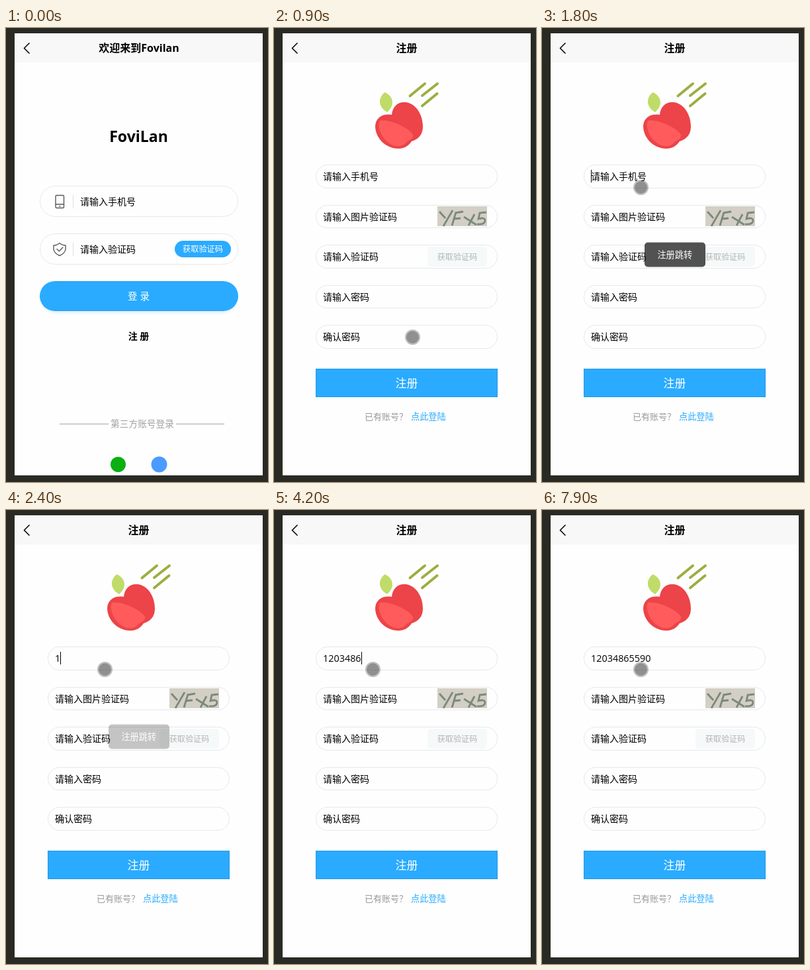
Write an HTML page that moves like this. It is 396x685 px and loops after 8000 ms.

```html
<!DOCTYPE html>
<html lang="zh-CN">
<head>
<meta charset="utf-8">
<title>注册</title>
<style>
html, body { margin: 0; width: 100%; height: 100%; overflow: hidden; background: #292a23; }
svg { display: block; }
text { font: 14px "Open Sans", "Noto Sans CJK SC", "Noto Sans CJK", sans-serif; fill: #000; white-space: pre; }
.mid { text-anchor: middle; }
.bold { font-weight: 700; }
.white { fill: #fff; }
.field { fill: #fefefe; stroke: #e6e8e9; }
.icon { fill: none; stroke: #5a5a5a; stroke-width: 1.4; stroke-linejoin: round; stroke-linecap: round; }
.rule { stroke: #a6a6a6; }
.blue { fill: #2aabff; }
.edge { fill: none; stroke: #2599e5; }
</style>
</head>
<body>
<svg width="396" height="685" viewBox="0 0 396 685">
  <defs>
    <filter id="glow" x="-10%" y="-30%" width="120%" height="180%">
      <feGaussianBlur stdDeviation="2.5"/>
    </filter>
    <radialGradient id="press">
      <stop offset="0" stop-color="#000" stop-opacity=".28"/>
      <stop offset="1" stop-color="#000" stop-opacity=".04"/>
    </radialGradient>
  </defs>

  <rect width="396" height="685" fill="#292a23"/>
  <rect x="13" y="8" width="375" height="667" fill="#fefefe"/>
  <rect x="13" y="8" width="375" height="44" fill="#f8f8f8"/>
  <path d="M35.5 22.5L27.5 30.5L35.5 38.5" fill="none" stroke="#000" stroke-width="1.5"/>

  <g id="login">
    <text class="mid bold" x="201" y="36" style="font-size:16px">欢迎来到Fovilan</text>
    <text class="mid bold" x="200.5" y="172" style="font-size:23px">FoviLan</text>

    <rect class="field" x="51.5" y="238.5" width="299" height="46" rx="23"/>
    <rect class="field" x="51.5" y="310.5" width="299" height="46" rx="23"/>
    <path d="M101.5 252V272M101.5 324V344" stroke="#dedede"/>
    <g class="icon">
      <rect x="75" y="252.5" width="12.5" height="19" rx="1.5"/>
      <path d="M75 266H87.5M80.7 269H82"/>
      <path d="M81 324.5Q85 328 90 328V334Q89 340 81 343.5Q73 340 72 334V328Q77 328 81 324.5Z"/>
      <path d="M77 333.5L80.3 336.7L86 331"/>
    </g>
    <text x="112" y="267">请输入手机号</text>
    <text x="112" y="339">请输入验证码</text>
    <rect class="blue" x="255" y="321" width="85" height="25" rx="12.5"/>
    <text class="mid white" x="297.5" y="338" style="font-size:12.2px">获取验证码</text>

    <rect x="54" y="386" width="294" height="43" rx="21.5" fill="#c9e9ff" filter="url(#glow)"/>
    <rect class="blue" x="51" y="382" width="300" height="45" rx="22.5"/>
    <path class="edge" d="M73 382.5H329M73 426.5H329"/>
    <text class="mid white" x="200.5" y="410" style="font-size:14.5px">登 录</text>
    <text class="mid bold" x="200.5" y="470">注 册</text>

    <path class="rule" d="M81 597.5H155M257 597.5H330"/>
    <text class="mid" x="206" y="602" style="font-size:13.7px;fill:#a0a0a0">第三方账号登录</text>
    <circle cx="169.5" cy="658.5" r="11.5" fill="#0aaf12"/>
    <circle cx="231.5" cy="658.5" r="12" fill="#4a9bff"/>
  </g>

  <g id="signup">
    <text class="mid bold" x="200.5" y="36" style="font-size:16px">注册</text>

    <path fill="#ec4448" d="M178 131C179 118 188 111 198 112C214 113 225 130 225 149C225 162 217 168 208 171C203 178 197 182 188 182C168 182 153 165 153 148C154 135 164 129 178 131Z"/>
    <path fill="#ff5b5d" d="M160 140C171 137 202 148 210 161C211 168 204 169 200 172C197 177 190 179 184 178C169 176 154 153 160 140Z"/>
    <path fill="#bfdc68" d="M167.500 97C181 103 183 117 171 127C158 120 156 106 167.500 97Z"/>
    <path d="M205.500 102.500L228 84M224 102L247 84M224 117.500L246.500 99" fill="none" stroke="#9cae40" stroke-width="4" stroke-linecap="round"/>

    <g id="fields"></g>
    <text id="phone" x="74" y="229"></text>
    <rect id="caret" y="214" width="1" height="19"/>

    <rect x="247" y="269" width="75" height="30" fill="#d3cfc4"/>
    <path d="M250 277L259 287M270 275L256 299M275 278L269 298M274 279L286 277M272 288L282 287M287 285L306 297M303 281L294 298M321 278L311 279L309 288Q319 285 319 291Q318 297 307 296" fill="none" stroke="#7c897d" stroke-width="2.8"/>
    <rect x="232" y="330" width="90" height="30" rx="5" fill="#f6f9f9"/>
    <text class="mid" x="277" y="350" style="font-size:12.1px;fill:#b4b4b4">获取验证码</text>

    <rect class="blue" x="63" y="514" width="275" height="43"/>
    <rect class="edge" x="63.5" y="514.5" width="274" height="42"/>
    <text class="mid white" x="200.5" y="542" style="font-size:17px">注册</text>
    <text x="137" y="591" style="font-size:13px;fill:#999">已有账号？</text>
    <text x="207" y="591" style="font-size:13.2px;fill:#2aabff">点此登陆</text>

    <g id="toast">
      <rect x="155" y="323.5" width="92" height="37" rx="5" fill="#111" fill-opacity=".72"/>
      <text class="mid white" x="200.8" y="347" style="font-size:13.2px">注册跳转</text>
    </g>
  </g>

  <g id="touch">
    <circle r="11.5" fill="#000" fill-opacity=".25"/>
    <circle r="9" fill="#000" fill-opacity=".24" stroke="#000" stroke-opacity=".12"/>
    <circle id="held" r="10" fill="url(#press)"/>
  </g>
</svg>

<script>
const LOOP = 8000, STEP = 100;
const NUMBER = "12034865590", DIGIT = 8.237;
const KEYS = [2400, 2700, 2900, 3200, 3700, 3900, 4200, 5800, 6300, 6400, 7500];
const CARET_OFF = [[2200, 2400], [3600, 3700], [4600, 5100], [5500, 5800], [6900, 7300], [7900, 8000]];
const PATH = [
  [100, 315, 305], [200, 240, 390], [300, 135, 485], [400, 78, 519], [500, 150, 492],
  [600, 209.5, 466.5], [900, 209.5, 466.5], [1500, 149.5, 240.5]
];
const el = id => document.getElementById(id);
const clamp = v => Math.max(0, Math.min(1, v));
const within = (t, a, b) => t >= a && t < b;
const show = (id, on) => { el(id).style.display = on ? "" : "none"; };

// Rows sit 60.5 px apart, so every other one snaps to a shorter box.
const labels = ["", "请输入图片验证码", "请输入验证码", "请输入密码", "确认密码"];
el("fields").innerHTML = labels.map((label, i) => {
  const y = 206.5 + Math.round(i * 60.5), h = 35 - i % 2;
  return `<rect class="field" x="63.5" y="${y}" width="274" height="${h}" rx="${h / 2}"/>
    <text x="74" y="${y + 22.5}">${label}</text>`;
}).join("");

function touchAt(t) {
  const i = PATH.findIndex(p => p[0] > t);
  if (i < 0) return PATH[PATH.length - 1].slice(1);
  if (i === 0) return PATH[0].slice(1);
  const [t0, x0, y0] = PATH[i - 1], [t1, x1, y1] = PATH[i];
  const u = (t - t0) / (t1 - t0), k = u * u * (3 - 2 * u);
  return [x0 + (x1 - x0) * k, y0 + (y1 - y0) * k];
}

function draw(t) {
  show("login", t < 900);
  show("signup", t >= 900);

  const typed = KEYS.filter(k => k <= t).length;
  const phone = el("phone");
  phone.textContent = typed ? NUMBER.slice(0, typed) : "请输入手机号";
  phone.style.fontSize = typed ? "14.4px" : "14px";
  el("caret").setAttribute("x", 74 + Math.round(typed * DIGIT));
  show("caret", t >= 1700 && !CARET_OFF.some(([a, b]) => within(t, a, b)));

  el("toast").style.opacity = Math.min(clamp((t - 900) / 200), clamp((2500 - t) / 300));

  show("touch", t >= 100);
  show("held", within(t, 600, 900) || within(t, 1700, 1800));
  el("touch").setAttribute("transform", `translate(${touchAt(t)})`);
}

const start = performance.now();
function tick() {
  const t = (performance.now() - start) % LOOP;
  draw(Math.floor(t / STEP) * STEP);
  requestAnimationFrame(tick);
}
tick();
</script>
</body>
</html>
```
